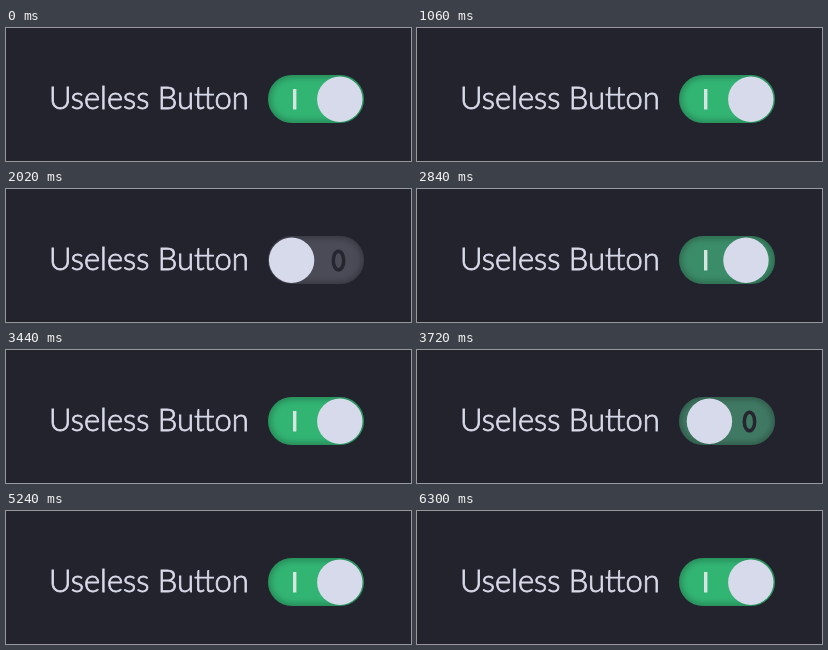
Write an HTML page that moves like this. It is 405 px wide and 133 px high and loops after 6320 ms.

```html
<!DOCTYPE html>
<html lang="en">
<head>
<meta charset="utf-8">
<title>Useless Button</title>
<style>
  html, body { margin: 0; width: 100%; height: 100%; overflow: hidden; background: #23232d; }
  svg { display: block; width: 405px; height: 133px; }
  text { font: 300 31px Lato, "Open Sans", sans-serif; fill: #d9dbea; stroke: #d9dbea; stroke-width: .8px; }
</style>
</head>
<body>
<svg viewBox="0 0 405 133">
  <defs>
    <clipPath id="pill"><rect x="262" y="47" width="96" height="48" rx="24"/></clipPath>
    <filter id="soft" x="-20%" y="-40%" width="140%" height="180%"><feGaussianBlur stdDeviation="3"/></filter>
  </defs>
  <rect width="405" height="133" fill="#23232d"/>
  <text x="43" y="81">Useless Button</text>
  <g clip-path="url(#pill)">
    <rect id="track" x="262" y="47" width="96" height="48"/>
    <rect x="261" y="46" width="98" height="50" rx="25" fill="none" stroke="#000"
      stroke-opacity=".3" stroke-width="6" filter="url(#soft)"/>
  </g>
  <rect id="one" x="287" y="61" width="3.4" height="20.5" fill="#d5e6e2"/>
  <ellipse id="zero" cx="332.5" cy="71.5" rx="5.2" ry="9.3" fill="none" stroke="#25262f" stroke-width="3.5"/>
  <circle id="knob" cy="71.2" r="22.7" fill="#d7daea"/>
</svg>
<script>
const LOOP = 6320, DURATION = 400;
const OFF = { x: 285.6, color: [74, 75, 87] };
const ON = { x: 333.8, color: [50, 180, 115] };
const clicks = [1550, 2592, 3496, 4712];
const [track, one, zero, knob] = ["track", "one", "zero", "knob"].map(id => document.getElementById(id));

const mix = (a, b, k) => a + (b - a) * k;
const bezier = (a, b, s) => 3 * a * s * (1 - s) ** 2 + 3 * b * s * s * (1 - s) + s ** 3;

// cubic-bezier(.25, .1, .25, 1), solved by bisection
function ease(p) {
  if (p <= 0 || p >= 1) return p <= 0 ? 0 : 1;
  let low = 0, high = 1;
  for (let i = 0; i < 24; i++) {
    const s = (low + high) / 2;
    if (bezier(0.25, 0.25, s) < p) low = s; else high = s;
  }
  return bezier(0.1, 1, low);
}

function draw(time) {
  const count = clicks.filter(click => click <= time).length;
  const isOn = count % 2 === 0;
  const [from, to] = isOn ? [OFF, ON] : [ON, OFF];
  const progress = count ? Math.min(1, (time - clicks[count - 1]) / DURATION) : 1;

  knob.setAttribute("cx", mix(from.x, to.x, ease(progress)));
  track.setAttribute("fill", `rgb(${from.color.map((c, i) => Math.round(mix(c, to.color[i], progress)))})`);
  one.setAttribute("visibility", isOn ? "visible" : "hidden");
  zero.setAttribute("visibility", isOn ? "hidden" : "visible");
}

const start = performance.now();
function tick() {
  draw((performance.now() - start) % LOOP);
  requestAnimationFrame(tick);
}
tick();
</script>
</body>
</html>
```
